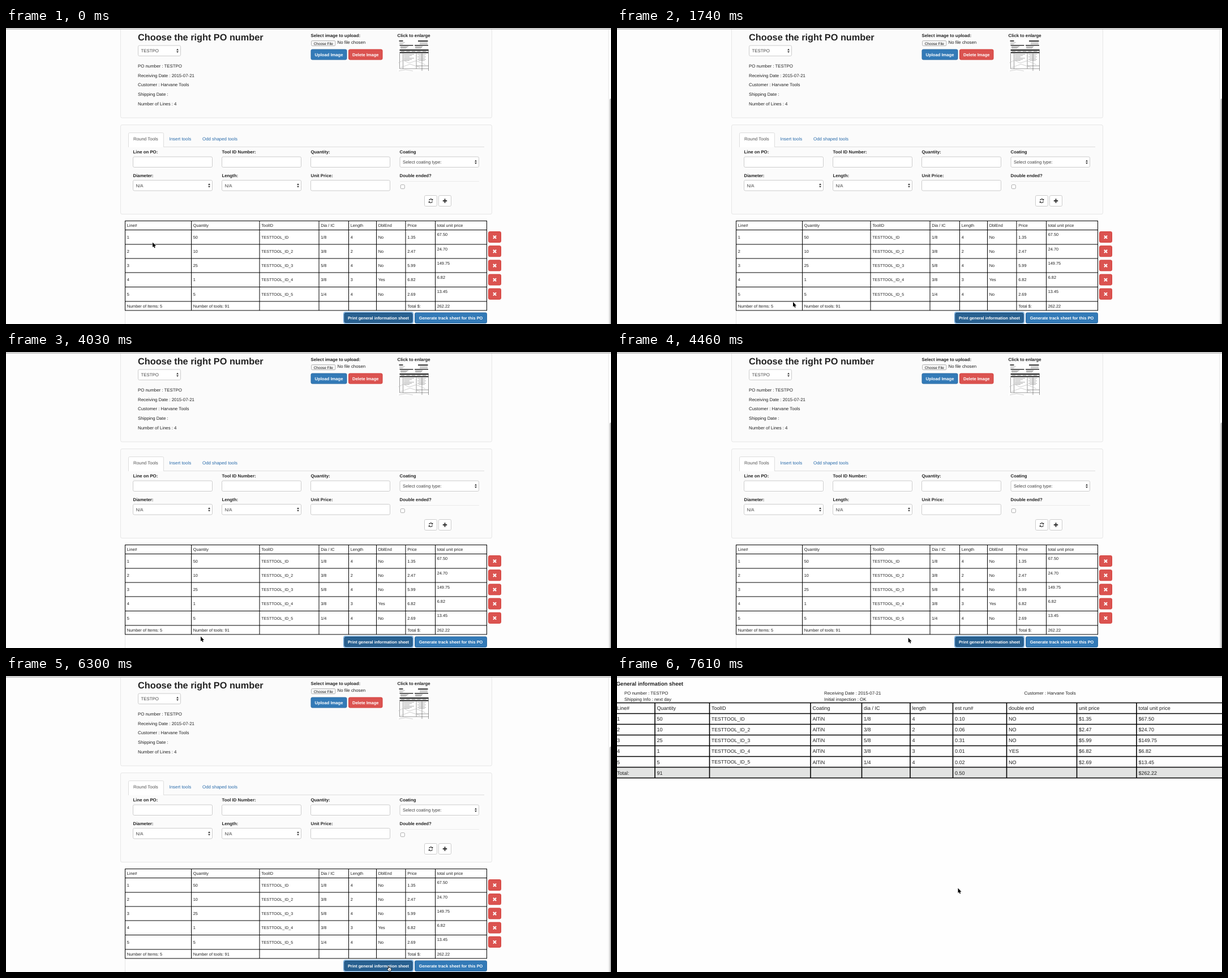
These frames come from a looping animation (1069 px wide and 524 px high, 7.99 s). An HTML page:

```html
<!DOCTYPE html>
<html lang="en">
<head>
<meta charset="utf-8">
<title>Purchase order sheet</title>
<style>
  html, body { margin: 0; width: 100%; height: 100%; overflow: hidden; background: #fdfdfd; }
  svg { display: block; width: 1069px; height: 524px; }
  text { font-family: "Liberation Sans", Arial, sans-serif; text-rendering: geometricPrecision; white-space: pre; }
</style>
</head>
<body>
<svg id="stage" viewBox="0 0 1069 524" xmlns="http://www.w3.org/2000/svg">
  <g id="form"></g>
  <g id="sheet"></g>
  <g id="chrome"></g>
  <path id="arrow" d="M0 0V8.6L1.9 6.9L3.2 9.9L4.7 9.3L3.4 6.4H6Z" fill="#000" stroke="#fff" stroke-width=".7" paint-order="stroke"/>
  <g id="hand" stroke="#111" stroke-width=".9" stroke-linejoin="round">
    <path d="M2.2 5.6V1.2Q2.9 .1 3.6 1.2V3.7Q4.5 3 5.1 3.9Q6 3.3 6.5 4.2Q7.6 3.8 7.8 5V7L7 9.5H3.2L.6 6.3Q.5 5 2.2 5.6Z" fill="#fff"/>
    <path d="M4.1 6V8M5.5 6V8" fill="none" stroke-width=".6"/>
  </g>
</svg>
<script>
const $ = id => document.getElementById(id);
const BLUE = '#337ab7', RED = '#db5350', INK = '#222', LOOP = 7990;
let layer;

function add(tag, attrs, content) {
  const el = document.createElementNS('http://www.w3.org/2000/svg', tag);
  for (const k in attrs) el.setAttribute(k, attrs[k]);
  if (content !== undefined) el.textContent = content;
  layer.append(el);
}
const rect = (x, y, width, height, fill, stroke = 'none', rx = 0) =>
  add('rect', { x, y, width, height, fill, stroke, rx });
const path = (d, stroke, width = 1, fill = 'none') =>
  add('path', { d, stroke, 'stroke-width': width, fill });
// y is the middle of the capital letters
const text = (x, y, str, size = 7.85, fill = INK, weight = 400, anchor = 'start') =>
  add('text', { x, y: y + size * .36, 'font-size': size, fill, 'font-weight': weight, 'text-anchor': anchor }, str);
const label = (x, y, str) => text(x, y, str, 7.8, INK, 700);

function button(x, y, w, h, fill, stroke, str, size) {
  rect(x, y, w, h, fill, stroke, 2.2);
  text(x + w / 2, y + h / 2, str, size, '#fff', 700, 'middle');
}
function select(x, y, w, str, ink = '#444') {
  rect(x, y, w, 18.5, '#fff', '#ccc', 2.2);
  text(x + 5, y + 9.5, str, 7.85, ink);
  const ax = x + w - 5.5, ay = y + 9.3;
  path(`M${ax - 1.9} ${ay - .9}h3.8l-1.9-2.9zM${ax - 1.9} ${ay + .9}h3.8l-1.9 2.9z`, 'none', 0, '#333');
}
function grid(xs, ys, left, right, width) {
  const top = ys[0], bottom = ys[ys.length - 1];
  path(xs.map(x => `M${x} ${top}V${bottom}`).join('') +
       ys.map(y => `M${left} ${y}H${right}`).join(''), '#000', width);
}

const CUSTOMER = 'Customer : Harvane Tools';
const items = [
  [50, '', '1/8', 4, 'No', '1.35', '67.50', '0.10'],
  [10, '_2', '3/8', 2, 'No', '2.47', '24.70', '0.06'],
  [25, '_3', '5/8', 4, 'No', '5.99', '149.75', '0.31'],
  [1, '_4', '3/8', 3, 'Yes', '6.82', '6.82', '0.01'],
  [5, '_5', '1/4', 4, 'No', '2.69', '13.45', '0.02']
];

function thumbnail() {
  rect(692, 20, 55.5, 57, '#fff');
  rect(694.5, 22, 7, 1.8, '#333');
  rect(728, 22.2, 17.5, 1.8, '#222');
  for (let i = 0; i < 3; i++) {
    rect(695, 25.2 + i * 1.6, 10 - i * 2, .6, '#999');
    rect(731, 25.2 + i * 1.6, 14, .6, '#888');
    rect(697, 32.5 + i * 1.5, 14 - i * 2, .7, '#777');
    rect(723, 32.5 + i * 1.5, 13 - i, .7, '#777');
  }
  rect(695.5, 30, 24, 1.4, '#222');
  rect(722, 30, 24, 1.4, '#222');
  rect(695.5, 38, 51, 2.3, '#222');
  rect(695.5, 42.5, 51, 2, '#222');
  for (let i = 0; i < 5; i++) rect(698 + i * 9.5, 40.9, 6, .7, '#777');
  for (let i = 0; i < 6; i++) {
    rect(703, 46.3 + i * 2.2, 18 - i % 3 * 4, .7, '#888');
    rect(727 + i % 2 * 2, 46.3 + i * 2.2, 15 - i % 2 * 4, .7, '#999');
  }
  path('M695.5 45V72M701.5 45V72M725 45V72M735 45V76M746.5 38V76M695.5 72H746.5M725 67H746.5', '#555', .6);
  path('M693 62L702 57L712 62L725 58L741 65M697 70L714 64L732 70M694 76L706 74L719 76', '#bbb', .7);
}

function drawForm() {
  layer = $('form');
  rect(0, 0, 1069, 524, '#fdfdfd');
  rect(202.5, -6, 656, 165, '#fbfbfb', '#e6e6e6', 2.5);
  rect(202.5, 171.5, 656, 158, '#fbfbfb', '#e6e6e6', 2.5);

  text(233, 16, 'Choose the right PO number', 16.3, INK, 700);
  select(233.5, 31, 75, 'TESTPO');
  ['PO number : TESTPO', 'Receiving Date : 2015-07-21', CUSTOMER, 'Shipping Date :', 'Number of Lines : 4']
    .forEach((s, i) => text(233, 67 + i * 16.8, s));

  label(538.5, 12.7, 'Select image to upload:');
  rect(539.5, 22.5, 42.5, 9, '#f6f6f6', '#b5b5b5', 2);
  text(560.8, 27.2, 'Choose File', 6.4, '#111', 400, 'middle');
  text(585.5, 25.5, 'No file chosen');
  button(539, 38, 63, 18, BLUE, '#2e6da4', 'Upload Image', 7.6);
  button(605.5, 38, 59.5, 18, RED, '#d43f3a', 'Delete Image', 7.55);
  label(691.5, 12.7, 'Click to enlarge');
  thumbnail();

  path('M216 210.5H845', '#ddd');
  path('M216.5 211V187.5Q216.5 185.5 218.5 185.5H276.5Q278.5 185.5 278.5 187.5V211', '#ddd', 1, '#fff');
  text(225, 196.5, 'Round Tools', 7.9, '#555');
  text(288.5, 196.5, 'Insert tools', 7.9, '#2a6cab');
  text(347, 196.5, 'Odd shaped tools', 7.9, '#2a6cab');

  const cols = [224.5, 381.5, 538.5, 695.5];
  ['Line on PO:', 'Tool ID Number:', 'Quantity:', 'Coating'].forEach((s, i) => label(cols[i], 219.5, s));
  ['Diameter:', 'Length:', 'Unit Price:', 'Double ended?'].forEach((s, i) => label(cols[i], 261, s));
  for (const x of cols.slice(0, 3)) rect(x, 228, 140, 18.5, '#fff', '#ccc', 2.2);
  select(cols[3] + .5, 228, 139.5, 'Select coating type:');
  select(cols[0], 269.5, 140, 'N/A');
  select(cols[1], 269.5, 140, 'N/A');
  rect(cols[2], 269.5, 140, 18.5, '#fff', '#ccc', 2.2);
  path('M696 271.5H836', '#eaeaea');
  rect(697.3, 277.5, 7, 7, '#fff', '#b0b0b0', 1.5);

  rect(739.5, 296.5, 22, 19, '#fff', '#ccc', 2.2);
  path('M747.6 305.2A3.1 3.1 0 0 1 753 303.8M753.4 307A3.1 3.1 0 0 1 748 308.2', '#333', 1.2);
  path('M754.3 302.2V305.2H751.3ZM746.7 309.9V306.9H749.7Z', 'none', 0, '#333');
  rect(764.5, 296.5, 22, 19, '#fff', '#ccc', 2.2);
  path('M771.8 306H779.2M775.5 302.3V309.7', '#333', 2);

  const xs = [210.5, 327.5, 448, 553, 605.5, 654.5, 706, 758.5, 849.5];
  const row = (cells, y, lastY = y) => cells.forEach((s, i) =>
    text(xs[i] + 3.2, i == 7 ? lastY : y, s, /TOOL/.test(s) ? 7.05 : 7.35));
  rect(210.5, 341.5, 639, 158.5, '#fff');
  row(['Line#', 'Quantity', 'ToolID', 'Dia / IC', 'Length', 'DblEnd', 'Price', 'total unit price'], 349.5);
  items.forEach(([qty, id, dia, len, dbl, price, total], i) => {
    const y = 370.2 + i * 25.2;
    row([i + 1, qty, 'TESTTOOL_ID' + id, dia, len, dbl, price, total], y, y - 4.4);
    rect(852.5, y - 9.7, 22, 19, RED, '#d43f3a', 2.2);
    path(`M860.9 ${y - 2.6}l5.2 5.2m0 -5.2l-5.2 5.2`, '#fff', 2);
  });
  row(['Number of Items: 5', 'Number of tools: 91', '', '', '', '', 'Total $:', '262.22'], 492);
  grid(xs, [341.5, 357.5, 383, 408, 433, 458.5, 484, 500], 210, 850, 1);

  path('M210.5 501V524', '#e6e6e6');
  rect(596.5, 503, 123, 20, '#8fbde6', '#6aa6dc', 2.5);
  button(598, 504.5, 120, 17, '#286090', '#204d74', 'Print general information sheet', 7.32);
  button(722.5, 504, 127, 18.5, BLUE, '#2e6da4', 'Generate track sheet for this PO', 7.38);

  path('M1064.5 3V524', '#e8e8e8');
  rect(1066.5, 125, 4, 405, '#b9b9b9', 'none', 2);
}

function drawSheet() {
  layer = $('sheet');
  rect(0, 0, 1069, 524, '#fefefe');
  text(117, 13.6, 'General information sheet', 9.55, INK, 700, 'end');
  text(13, 30, 'PO number : TESTPO', 7.8);
  text(13, 41.2, 'Shipping Info : next day', 7.95);
  text(366, 30, 'Receiving Date : 2015-07-21', 7.9);
  text(366, 41.2, 'Initial inspection : OK', 7.95);
  text(719.5, 30, CUSTOMER, 7.9);

  const xs = [-3.5, 67, 163.5, 342, 432.5, 518, 593.5, 688.5, 812.5, 918];
  const row = (cells, i) => cells.forEach((s, c) =>
    text(xs[c] + 3.4, 57 + i * 19.05, s, /TOOL/.test(s) ? 8.65 : 9.05));
  rect(0, 161.5, 1069, 19, '#e2e3e2');
  row(['Line#', 'Quantity', 'ToolID', 'Coating', 'dia / IC', 'length', 'est run#', 'double end', 'unit price', 'total unit price'], 0);
  items.forEach(([qty, id, dia, len, dbl, price, total, run], i) =>
    row([i + 1, qty, 'TESTTOOL_ID' + id, 'AlTiN', dia, len, run, dbl.toUpperCase(), '$' + price, '$' + total], i + 1));
  row(['Total:', 91, '', '', '', '', '0.50', '', '', '$262.22'], 6);
  grid(xs, Array.from({ length: 8 }, (_, i) => 47.5 + i * 19), 0, 1069, 1.6);
}

drawForm();
drawSheet();
layer = $('chrome');
rect(0, 0, 1069, 1, '#e2e2e2');
rect(0, 1, 1069, 1.6, '#b8b8b8');

// Pointer moves: start, end, steps, x, y
const moves = [
  [0, 0, 1, 259, 379.5], [90, 90, 1, 259, 381.8], [410, 410, 1, 269, 418.5],
  [920, 1650, 9, 302, 475.5], [1740, 1740, 1, 311, 485],
  [1830, 2090, 4, 365, 499], [2180, 2520, 5, 409.5, 492.5], [2610, 2610, 1, 409.5, 493.5],
  [2970, 3670, 9, 329.5, 503], [4030, 4030, 1, 344, 503.5], [4120, 4550, 6, 600, 507],
  [4850, 5250, 5, 727, 496.8], [5330, 5630, 4, 681, 512], [5710, 5710, 1, 674, 512],
  [6040, 6040, 1, 673, 513], [7230, 7230, 1, 674, 507],
  [7520, 7520, 1, 645, 452], [7610, 7610, 1, 602.5, 375.5]
];
const stops = [];
let px = 259, py = 379.5;
for (const [start, end, n, x, y] of moves) {
  for (let k = 1; k <= n; k++) {
    const t = n > 1 ? start + (end - start) * (k - 1) / (n - 1) : start;
    stops.push([t, px + (x - px) * k / n, py + (y - py) * k / n]);
  }
  [px, py] = [x, y];
}

function frame() {
  const t = performance.now() % LOOP;
  const [, x, y] = stops.filter(s => s[0] <= t).pop();
  const overLink = t >= 5630 && t < 7230;
  $('form').style.display = t < 6600 ? '' : 'none';
  $('sheet').style.display = t < 6600 ? 'none' : '';
  $('arrow').style.display = overLink ? 'none' : '';
  $('hand').style.display = overLink ? '' : 'none';
  $(overLink ? 'hand' : 'arrow').setAttribute('transform', `translate(${x} ${y})`);
  requestAnimationFrame(frame);
}
frame();
</script>
</body>
</html>
```
